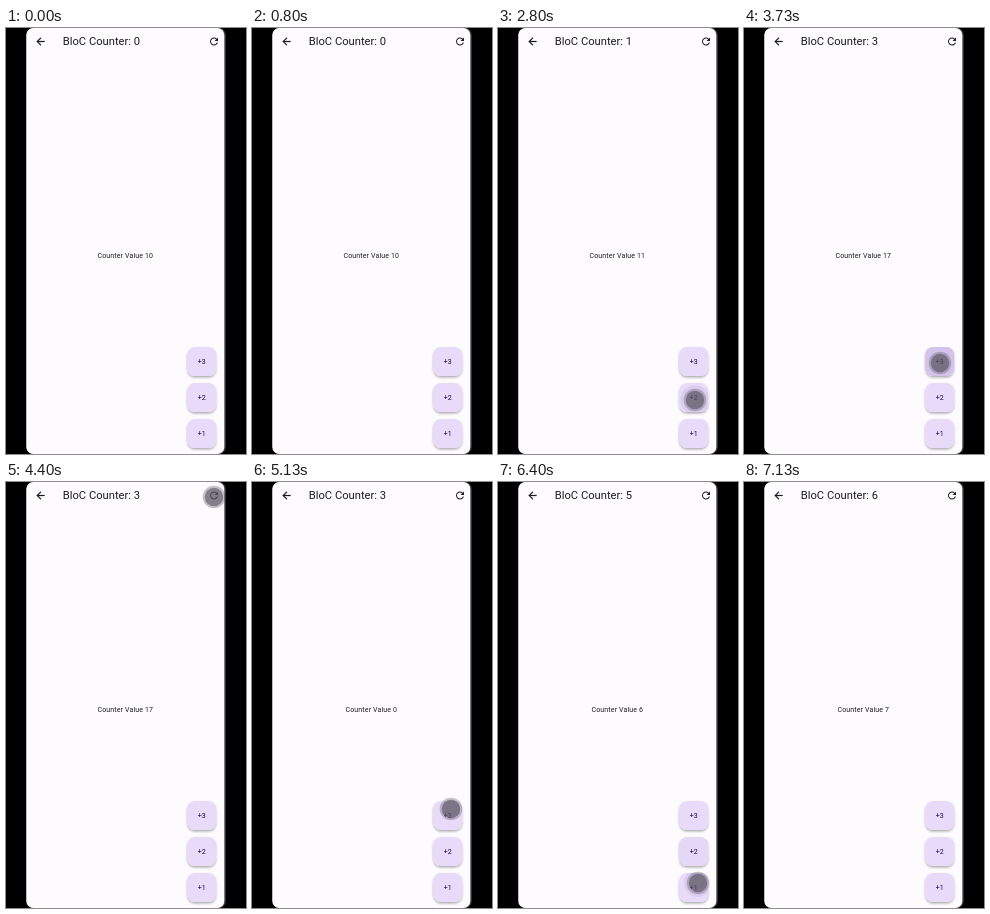
An HTML page that plays this animation: 240 px wide and 426 px high, repeating every 7.19 s.

```html
<!DOCTYPE html>
<html lang="en">
<head>
<meta charset="utf-8">
<title>BloC Counter</title>
<style>
html, body { margin: 0; width: 100%; height: 100%; overflow: hidden; background: #000; }
svg { display: block; width: 100%; height: 100%; font-family: Roboto, sans-serif; }
</style>
</head>
<body>
<svg viewBox="0 0 240 426">
  <defs>
    <filter id="shadow" x="-30%" y="-30%" width="160%" height="170%">
      <feDropShadow dx="0" dy="1.5" stdDeviation="1.3" flood-color="#000" flood-opacity=".32"/>
    </filter>
    <clipPath id="face"><rect x="-14.5" y="-14.5" width="29" height="29" rx="8"/></clipPath>
  </defs>
  <rect x="20.3" width="199.4" height="426" rx="7" fill="#45434d"/>
  <rect x="20.3" width="198" height="426" rx="7" fill="#fdfbfe"/>
  <g fill="#1d1b20">
    <path transform="translate(28.5 7.5) scale(.5)" stroke="#1d1b20" stroke-width=".5" d="M20 11H7.83l5.59-5.59L12 4l-8 8 8 8 1.41-1.41L7.83 13H20v-2z"/>
    <path transform="translate(202 7.5) scale(.5)" d="M17.65 6.35C16.2 4.9 14.21 4 12 4c-4.42 0-7.99 3.58-7.99 8s3.57 8 7.99 8c3.73 0 6.84-2.55 7.73-6h-2.08c-.82 2.33-3.04 4-5.65 4-3.31 0-6-2.69-6-6s2.69-6 6-6c1.66 0 3.14.69 4.22 1.78L13 11h7V4l-2.35 2.35z"/>
    <text id="title" x="56.8" y="17.3" font-size="11.2"></text>
    <text id="value" x="119.3" y="230.2" font-size="7" letter-spacing=".14" text-anchor="middle"></text>
  </g>
  <g id="buttons"></g>
  <g id="touch">
    <circle r="11.3" fill="#5b5661" opacity=".35"/>
    <circle r="9.2" fill="#5b5661" opacity=".62"/>
  </g>
</svg>
<script>
const LOOP = 7190, FPS = 15, TAP = 130, LIFT = 200, FADE = 650;
const $ = id => document.getElementById(id);
const buttonY = { 1: 405.5, 2: 369.5, 3: 333.5 };
const gain = { 1: 1, 2: 3, 3: 3 };

// Touch start, pressed button (0 resets), position
const taps = [
  [1870, 1, 196, 411],
  [2735, 2, 197, 372],
  [3600, 3, 196, 335],
  [4335, 0, 208, 15],
  [5110, 3, 199, 327],
  [5800, 2, 199, 364],
  [6340, 1, 200, 401]
];

$("buttons").innerHTML = [3, 2, 1].map(n => `
  <g transform="translate(195.7 ${buttonY[n]})">
    <rect x="-14.5" y="-14.5" width="29" height="29" rx="8" fill="#e8dbf9" filter="url(#shadow)"/>
    <g clip-path="url(#face)"><circle id="ink${n}" fill="#5b3d91"/></g>
    <text y="2.4" font-size="7" text-anchor="middle" fill="#21005d">+${n}</text>
  </g>`).join("");

function draw(t) {
  let count = 0, value = 10, finger = null;
  for (const n of [1, 2, 3]) $("ink" + n).setAttribute("opacity", 0);

  for (const [start, n, x, y] of taps) {
    const age = t - start;
    if (age < 0) break;
    if (age >= TAP) {
      value = n ? value + gain[n] : 0;
      if (n) count++;
    }
    if (age < LIFT) finger = [x, y];
    if (n && age < FADE) {
      const ink = $("ink" + n);
      ink.setAttribute("cx", x - 195.7);
      ink.setAttribute("cy", y - buttonY[n]);
      ink.setAttribute("r", 6 + 30 * Math.min(1, age / 225));
      ink.setAttribute("opacity", .15 * Math.min(1, age / 100, (FADE - age) / 400));
    }
  }

  $("title").textContent = "BloC Counter: " + count;
  $("value").textContent = "Counter Value " + value;
  $("touch").setAttribute("visibility", finger ? "visible" : "hidden");
  if (finger) $("touch").setAttribute("transform", `translate(${finger})`);
}

function frame() {
  const t = performance.now() % LOOP;
  draw(Math.floor((t + 4) * FPS / 1000) * 1000 / FPS);
  requestAnimationFrame(frame);
}
frame();
</script>
</body>
</html>
```
